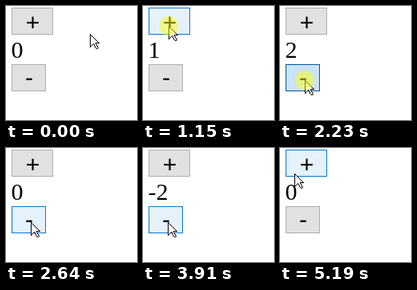
An HTML page with a canvas for the animation above (5.36 s loop, 164x143 px).

```html
<!DOCTYPE html>
<html lang="en">
<head>
<meta charset="utf-8">
<title>Counter</title>
<style>
  html, body { margin: 0; width: 100%; height: 100%; overflow: hidden; background: #fff; }
  canvas { display: block; }
</style>
</head>
<body>
<canvas id="stage" width="164" height="143"></canvas>
<script>
const ctx = document.getElementById('stage').getContext('2d');
const LOOP = 5360;
const TICK = 80; // the pointer is sampled once per tick

const plus = { label: '+', step: 1, x: 7, y: 2, w: 52, h: 34, baseline: 31 };
const minus = { label: '-', step: -1, x: 7, y: 73, w: 43, h: 34, baseline: 100 };

const home = { x: 105, y: 35 };
const moves = [
  { start: 270, ticks: 6, x: 32, y: 25 },
  { start: 1470, ticks: 1, x: 32, y: 26 },
  { start: 1780, ticks: 3, x: 31, y: 97 },
  { start: 2080, ticks: 1, x: 31, y: 93 },
  { start: 3980, ticks: 4, x: 18, y: 30 },
  { start: 5020, ticks: 3, x: 18, y: 32 }
];

const click = (button, start, end) =>
  // a long click shows its highlight one tick before the button goes down
  ({ button, start, end, down: end - start > TICK ? start + TICK : start });
const clicks = [
  click(plus, 830, 980), click(plus, 1150, 1300),
  click(minus, 2150, 2330), click(minus, 2480, 2640),
  click(minus, 3040, 3120), click(minus, 3360, 3430),
  click(plus, 4400, 4480), click(plus, 4710, 4870)
];

const styles = {
  normal: { border: '#adadad', fill: '#e1e1e1', width: 1 },
  hover: { border: '#0078d7', fill: '#e5f1fb', width: 1 },
  active: { border: '#005499', fill: '#cce4f7', width: 1 },
  focus: { border: '#0078d7', fill: '#e1e1e1', width: 2 }
};

function rect(color, x, y, w, h) {
  ctx.fillStyle = color;
  ctx.fillRect(x, y, w, h);
}

function pointerAt(t) {
  let { x, y } = home;
  for (const m of moves) {
    if (t < m.start) break;
    const tick = Math.min(m.ticks, 1 + Math.floor((t - m.start) / TICK));
    const eased = (tick / m.ticks) ** 1.15;
    x = Math.round(x + (m.x - x) * eased);
    y = Math.round(y + (m.y - y) * eased);
  }
  return { x, y };
}

function drawButton({ label, x, y, w, h, baseline }, { border, fill, width }) {
  rect(border, x, y, w, h);
  rect(fill, x + width, y + width, w - 2 * width, h - 2 * width);
  ctx.fillStyle = '#000';
  ctx.font = '30px "Liberation Sans", Arial, sans-serif';
  ctx.textAlign = 'center';
  ctx.fillText(label, x + (w + 1) / 2, baseline);
}

function drawPointer({ x, y }) {
  const span = (from, to, row) => {
    rect('#000', x + from, y + row, to - from + 1, 1);
    rect('#fff', x + from + 1, y + row, Math.max(0, to - from - 1), 1);
  };
  for (let row = 0; row < 17; row++) span(0, row < 12 ? row : 16 - row, row);
  for (let row = 12; row < 18; row++) {
    const slant = Math.ceil((row - 12) / 2);
    span(4 + slant, 7 + slant, row);
  }
  rect('#000', x + 7, y + 11, 5, 1);
  rect('#000', x + 8, y + 18, 2, 1);
}

function draw(t) {
  const pointer = pointerAt(t);
  const current = clicks.find(c => t >= c.start && t < c.end);
  const focused = clicks.findLast(c => c.down <= t)?.button;
  const count = clicks.reduce((sum, c) => sum + (t >= c.end ? c.button.step : 0), 0);

  rect('#fff', 0, 0, 164, 143);
  for (const b of [plus, minus]) {
    const over = pointer.x < b.x + b.w && pointer.y >= b.y && pointer.y < b.y + b.h;
    const down = current?.button === b && t >= current.down;
    drawButton(b, styles[down ? 'active' : over ? 'hover' : focused === b ? 'focus' : 'normal']);
  }

  ctx.fillStyle = '#000';
  ctx.font = '30px "Liberation Serif", "Times New Roman", serif';
  ctx.textAlign = 'left';
  ctx.fillText(count, 6.5, 65);

  drawPointer(pointer);
  if (current) {
    ctx.fillStyle = 'rgba(255, 255, 0, .47)';
    ctx.beginPath();
    ctx.arc(pointer.x, pointer.y, 12, 0, Math.PI * 2);
    ctx.fill();
  }
}

const start = performance.now();
function tick() {
  draw((performance.now() - start) % LOOP);
  requestAnimationFrame(tick);
}
tick();
</script>
</body>
</html>
```
